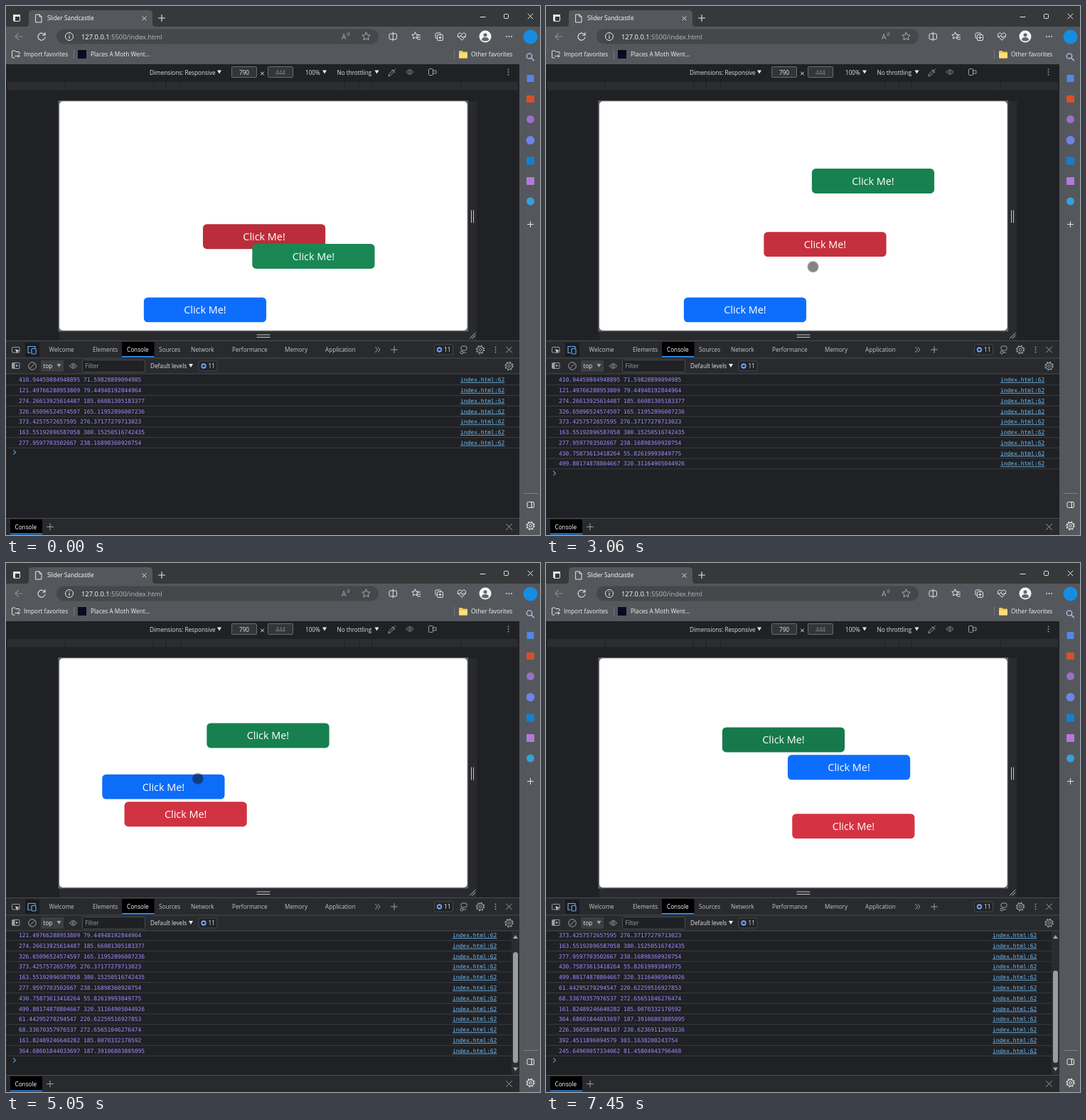
These frames come from a looping animation (751 by 745 pixels, 7.53 s). An HTML page:

```html
<!DOCTYPE html>
<html lang="en">
<head>
<meta charset="utf-8">
<title>Moving buttons</title>
<style>
html, body { margin: 0; width: 100%; height: 100%; overflow: hidden; background: #202124; }
svg { display: block; width: 751px; height: 745px; }
text { font-family: "Open Sans", "Noto Sans", sans-serif; white-space: pre; }
.mono { font-family: "DejaVu Sans Mono", "Noto Sans Mono", monospace; }
</style>
</head>
<body>
<script>
const LOOP = 7530, DUR = 2000, SCALE = 0.7266, LEFT = 75, TOP = 134.2;

// ---- drawing helpers ----
const rect = (x, y, w, h, fill, rx = 0, extra = '') =>
  `<rect x="${x}" y="${y}" width="${w}" height="${h}" fill="${fill}" rx="${rx}" ${extra}/>`;
const box = (x, y, w, h, stroke, rx = 0, fill = 'none', sw = 1) =>
  rect(x, y, w, h, fill, rx, `stroke="${stroke}" stroke-width="${sw}"`);
const disc = (x, y, r, fill) => `<circle cx="${x}" cy="${y}" r="${r}" fill="${fill}"/>`;
const ring = (x, y, r, stroke, w = 1) =>
  `<circle cx="${x}" cy="${y}" r="${r}" fill="none" stroke="${stroke}" stroke-width="${w}"/>`;
const line = (d, stroke = '#9aa0a6', w = 1) =>
  `<path d="${d}" fill="none" stroke="${stroke}" stroke-width="${w}" stroke-linecap="round" stroke-linejoin="round"/>`;
const shape = (d, fill) => `<path d="${d}" fill="${fill}"/>`;
const text = (x, y, s, fill = '#dfe1e5', size = 8.2, extra = '') =>
  `<text x="${x}" y="${y}" fill="${fill}" font-size="${size}" ${extra}>${s}</text>`;
const cross = (x, y, r, c, w) => line(`M${x - r} ${y - r}l${2 * r} ${2 * r}m0 ${-2 * r}l${-2 * r} ${2 * r}`, c, w);
const plus = (x, y, r, c, w) => line(`M${x - r} ${y}h${2 * r}M${x} ${y - r}v${2 * r}`, c, w);
const caret = (x, y, c = '#e8eaed') => shape(`M${x - 3} ${y - 2.5}h6l-3 5z`, c);
const dots = (x, y, dx, dy, c) => [-1, 0, 1].map(i => disc(x + i * dx, y + i * dy, 0.9, c)).join('');
const gear = (x, y, c) => ring(x, y, 1.8, c) + ring(x, y, 4.4, c, 1.1) +
  `<circle cx="${x}" cy="${y}" r="5.6" fill="none" stroke="${c}" stroke-width="1.3" stroke-dasharray="2.2 2.2"/>`;
const eye = (x, y, c) => line(`M${x - 5} ${y}q5 -7 10 0q-5 7 -10 0`, c) + ring(x, y, 1.6, c);
const star = (x, y, r, c) => {
  let d = '';
  for (let i = 0; i < 10; i++) {
    const a = Math.PI * (i / 5 - 0.5), q = i % 2 ? r * 0.48 : r;
    d += (i ? 'L' : 'M') + (x + q * Math.cos(a)).toFixed(2) + ' ' + (y + q * Math.sin(a)).toFixed(2);
  }
  return line(d + 'z', c);
};

// ---- browser window ----
const BAR = '#54585c', LIGHT = '#e6e7e8', DIM = '#9aa0a6', PANEL = '#292a2d', EDGE = '#494c50';

function titleBar() {
  return rect(0, 0, 751, 30, '#36383a') + rect(0, 29, 751, 53, BAR) +
    shape('M28 29q4 0 4 -4V11q0 -5 5 -5H201q5 0 5 5V25q0 4 4 4z', BAR) +
    box(10.5, 12.5, 9, 9, LIGHT, 1.5) + rect(10, 12, 10, 3, LIGHT, 1) + rect(10, 12, 3, 9, LIGHT, 1) +
    line('M42 12h5l3 3v8h-8zM47 12v3h3', LIGHT) +
    text(58, 20, 'Slider Sandcastle', '#fff', 8.3) +
    cross(194.5, 17.5, 2.5, LIGHT) + plus(219, 17, 4.5, LIGHT, 1.1) +
    line('M667 15.5h7', LIGHT) + box(700.5, 11.5, 6, 6, LIGHT, 1) + cross(737.5, 14.5, 3.5, LIGHT);
}

function addressBar() {
  return line('M23 43h-10m4.5 -4.5l-4.5 4.5l4.5 4.5', '#888c90', 1.1) +
    line('M54.3 40.5a5 5 0 1 0 .7 3.5M55 37.5v3.5h-3.5', LIGHT, 1.1) +
    rect(71, 32.5, 453, 21, '#44484b', 10.5) + ring(89, 43, 5.5, LIGHT) + line('M89 42.5v3M89 40.2v.1', LIGHT, 1.2) +
    text(106, 46.5, '127.0.0.1<tspan fill="#b9bcbf">:5500/index.html</tspan>', '#fff', 9.4) +
    text(472, 47, 'A', '#a9adb1', 10) + line('M480 38q1.5 1.5 0 3.5M482 37q2 2.5 0 5', '#a9adb1', .8) +
    star(506.5, 43, 6, '#a9adb1') +
    box(539, 39, 10.5, 8, LIGHT, 1.5) + line('M544.3 37v12', LIGHT) +
    star(575.5, 42, 5, LIGHT) + line('M578 41h4.5M578 44h4.5M579 47h3.5', LIGHT) +
    box(604, 38, 7.5, 7.5, LIGHT, 1.5) + box(606.5, 40.5, 8, 8, LIGHT, 1.5, BAR) + plus(610.5, 44.5, 2, LIGHT) +
    line('M641 48l-5 -5q-2 -4 2 -5q2 0 3 2q1 -2 3 -2q4 1 2 5zM635 43h3.5l1.5 -2l2 4l1.5 -2h3', LIGHT) +
    disc(674, 43, 8.5, '#f4f4f4') + disc(674, 40.7, 2.5, '#64686c') + shape('M669 48q0 -4 5 -4t5 4q-5 3 -10 0', '#64686c') +
    dots(707.5, 43, 3.5, 0, LIGHT) +
    line('M12 73h-2.5q-1 0 -1 -1V64q0 -1 1 -1h3l1.5 1.5h4q1 0 1 1v2M13 70.5h6m-2 -2l2 2l-2 2', LIGHT) +
    text(25, 71, 'Import favorites', '#f1f1f1', 8.3) + line('M95.5 62v12', '#74787c') +
    rect(101, 62, 12, 12, '#0a0a23') + text(119, 71, 'Places A Moth Went...', '#f1f1f1', 8.3) +
    line('M630.5 62v12', '#74787c') +
    shape('M637 64q0 -1 1 -1h3.5l1.5 1.5h5q1 0 1 1v7q0 1 -1 1h-10q-1 0 -1 -1z', '#f4c64f') + rect(637, 66.5, 12, 7, '#ffdc7c', 1) +
    text(654, 71, 'Other favorites', '#f1f1f1', 8.3);
}

function sideBar() {
  return rect(722, 29, 29, 716, BAR) + disc(737.5, 43.5, 10, '#168de2') +
    ring(736, 70.5, 3.7, '#a9c4f5', 1.3) + line('M738.8 73.3l3.5 3.5', '#a9c4f5', 1.5) +
    rect(732.5, 97, 10, 10, '#5187e8', 1) + rect(732, 126, 11, 10, '#d5512b', 1) +
    disc(737.5, 159.5, 5.5, '#9c6fc8') + disc(737.5, 189, 6, '#6f83e8') +
    rect(732, 212.5, 11, 11, '#147fd2', 1) + rect(732, 241, 11, 11, '#b678d8', 1) +
    disc(737.5, 275, 5.5, '#39a0d9') + plus(737.5, 307.5, 4, LIGHT) +
    line('M728 686.5h20', '#7c8084') + box(733, 698.5, 9.5, 8, LIGHT, 1.5) + line('M739.3 699v7', LIGHT, 1.2) +
    gear(737.5, 732, LIGHT);
}

function deviceArea() {
  const ticks = [2, 83.5, 208, 225.5, 246, 477, 497, 515, 640, 721];
  const ruler = ticks.slice(1).map((x, i) => rect(ticks[i], 107, x - ticks[i] - 1, 11.5, '#2c2d30')).join('');
  return rect(0, 82, 722, 390, '#202124') + ruler +
    text(202, 96.5, 'Dimensions: Responsive') + caret(300, 93) +
    box(317.5, 85.5, 35, 15, '#6a6d71', 1, '#333538') + text(335, 96.5, '790', '#e8eaed', 8.2, 'text-anchor="middle"') +
    cross(360.5, 95, 2, '#e8eaed') +
    box(368.5, 85.5, 35, 15, '#6a6d71', 1, '#333538') + text(386, 96.5, '444', '#85898d', 8.2, 'text-anchor="middle"') +
    text(421, 96.5, '100%') + caret(448, 93) + text(465.5, 96.5, 'No throttling') + caret(521.5, 93) +
    line('M538 98.5l1 -3l5 -5l2 2l-5 5zM543 89.5l4 4M545.5 91l2 -2.2', DIM) + eye(568, 93, '#85898d') +
    box(594.5, 88.5, 6, 9, DIM, 1) + line('M600 91h5v4h-5', DIM) + dots(706.5, 93, 0, 3.5, DIM) +
    rect(650, 134, 12.5, 325, '#292a2d') + rect(75, 459, 587, 12, '#292a2d') +
    line('M654.5 288v17M657.5 288v17', '#c5c7ca') + line('M353 463h18M353 466.5h18', '#c5c7ca') +
    line('M652.5 468l7.5 -7.5M656 468l4 -4', '#c5c7ca') +
    rect(73.5, 133, 576.5, 325.5, '#63666a', 1) + rect(75, 134.3, 573.6, 322.7, '#fff', 5);
}

function toolsPanel() {
  const tabs = [[60.5, 'Welcome'], [122, 'Elements'], [170, 'Console'], [215, 'Sources'], [260, 'Network'],
    [318, 'Performance'], [392, 'Memory'], [449, 'Application']];
  const issues = (x, y) => box(x + .5, y - 7, 26, 14, '#45484c', 2, '#222326') +
    disc(x + 7.5, y, 3.7, '#66a3ff') + rect(x + 5.8, y - 1.2, 3.4, 2.4, '#1b1c1f') + text(x + 14, y + 3, '11', '#e8eaed', 8.2);
  return rect(0, 471, 722, 274, '#202124') + rect(0, 471, 722, 47, PANEL) +
    rect(0, 471, 722, 1, '#484b4f') + rect(0, 495.5, 722, 1, EDGE) + rect(0, 517.5, 722, 1, EDGE) +
    box(8.5, 480.5, 10.5, 7.5, DIM, 1) + shape('M13 483l6 2.5l-2.5 1l-1 3z', '#d0d2d5') +
    rect(27, 474, 20, 20, '#1b1c1f') +
    line('M34 488.5h-3V479.5h10v2', '#66a9ef', 1.2) + box(36, 482.5, 6, 7.5, '#66a9ef', 1, 'none', 1.2) +
    rect(163, 473, 45.5, 22.5, '#000') + rect(163, 493, 45.5, 2, '#2b88e6') +
    tabs.map(([x, s]) => text(x, 487, s, s === 'Console' ? '#fff' : '#c3c6ca')).join('') +
    line('M519.5 480.5l3 3.5l-3 3.5M523 480.5l3 3.5l-3 3.5', DIM) + plus(546, 484, 4.5, DIM) + issues(602, 484) +
    box(640, 479, 8, 6, DIM, 2) + ring(641, 488, 2, DIM) + line('M643 488h4', DIM) +
    gear(667, 484, DIM) + dots(688.5, 484, 0, 3.5, DIM) + cross(707.5, 484, 4, DIM) +
    box(8.5, 502.5, 10.5, 8, DIM, 1) + rect(9, 503, 3.5, 7, DIM) + shape('M14 504.5l3.5 2l-3.5 2z', DIM) +
    ring(37, 507, 5.3, DIM) + line('M33.4 510.6l7.2 -7.2', DIM) +
    rect(49, 499, 32, 16, '#3c3e42', 1) + text(52.5, 510, 'top', '#e8eaed') + caret(74.5, 506.5, DIM) +
    eye(94.5, 507, DIM) + box(107.5, 498.5, 88, 17, EDGE, 1, '#202124') + text(111.5, 510, 'Filter', DIM) +
    text(203, 510, 'Default levels') + caret(260, 506.5) + issues(270.5, 507) + gear(707.5, 507, DIM);
}

const drawer = () => rect(0, 721, 722, 24, PANEL) + rect(0, 721, 722, 1, EDGE) + rect(6, 723, 45, 22, '#000') +
  rect(6, 742.5, 45, 2, '#2b88e6') + text(12.5, 737, 'Console', '#fff') + plus(62, 733.5, 4.5, DIM) + cross(707.5, 733.5, 4, DIM);

// ---- console ----
const logs = [
  '410.94459804948895 71.59828899094985', '121.49766288953809 79.44948192844964',
  '274.26613925614487 185.66081305183377', '326.65096524574597 165.11952896007236',
  '373.4257572657595 276.37177279713023', '163.55192096587058 380.15250516742435',
  '277.9597703502667 238.16898360920754', '430.75873613418264 55.82619993849775',
  '499.80174878804667 320.31164905044926', '61.44295270294547 220.62259516927853',
  '68.33670357976537 272.65651046276474', '161.82489246640282 185.0070332170592',
  '364.68601844033697 187.39106803805095', '226.36058398746107 230.62369112093236',
  '392.4511896094579 303.1638200243754', '245.64969057334062 81.45804943796468'];
const ROW = 14.78;

function consoleRows(n) {
  const bar = n > 11, right = bar ? 711 : 722;
  const scroll = Math.max(0, 526.5 + (n - 1) * ROW - 687);
  let out = '';
  for (let i = 0; i < n; i++) {
    const y = 526.5 + i * ROW - scroll;
    if (y < 512) continue;
    out += text(18, y + 2.7, logs[i], '#9f8bff', 7.96, 'class="mono"') +
      text(bar ? 628 : 639, y + 2.7, 'index.html:62', '#72bdf5', 7.96, 'class="mono" text-decoration="underline"') +
      rect(0, y + 6.7, right, 1, '#3a3c40');
  }
  const py = 628.5 + (n - 7) * ROW - scroll;
  out += line(`M10.5 ${py - 2.8}l3 2.8l-3 2.8`, '#4aa3ee', 1.1);
  if (bar) {
    const h = 170 * 203 / (n * ROW + 29);
    out += rect(711, 518.5, 11, 202.5, '#2b2c2f') + rect(713, 704 - h, 7, h, '#9a9c9f', 3.5) +
      shape('M713 529h7l-3.5 -5z', '#a6a8ab') + shape('M713 710.5h7l-3.5 5z', '#a6a8ab');
  }
  return out;
}

// ---- motion ----
const mix = (a, b, k) => a + (b - a) * k;

// CSS "ease": cubic-bezier(.25, .1, .25, 1)
function ease(x) {
  if (x <= 0) return 0;
  if (x >= 1) return 1;
  const bez = (a, b, u) => 3 * (1 - u) ** 2 * u * a + 3 * (1 - u) * u * u * b + u ** 3;
  let lo = 0, hi = 1;
  for (let i = 0; i < 24; i++) {
    const m = (lo + hi) / 2;
    if (bez(.25, .25, m) < x) lo = m; else hi = m;
  }
  return bez(.1, 1, lo);
}

// A value that is retargeted mid-way, like an interrupted CSS transition
const track = (start, keys) => t => {
  let from = start, to = start, at = -1e6;
  for (const [k, v] of keys) {
    if (k > t) break;
    from = mix(from, to, ease((k - at) / DUR));
    to = v;
    at = k;
  }
  return mix(from, to, ease((t - at) / DUR));
};

function along(points, t) {
  let i = 1;
  while (i < points.length - 1 && points[i][0] < t) i++;
  const a = points[i - 1], b = points[i], k = (t - a[0]) / (b[0] - a[0]);
  return a.slice(1).map((v, j) => mix(v, b[j + 1], k));
}

const FIRST = 7;
const taps = [2286, 2760, 3466, 3972, 4470, 4952, 5476, 6000, 6673];
const order = 'grbrgbgrg';
const clock = [[0, 0], [2270, 2270], [2350, 2285], [2430, 2430], [3780, 3780], [4490, 4540],
  [5690, 5738], [6640, 6718], [7450, 7410], [7530, 7490]];
const pointer = [[1330, 612, 400], [2030, 438, 346], [2190, 385, 354], [2270, 380, 354], [2300, 380, 354],
  [2760, 405, 326], [3466, 335, 424], [3780, 454, 386], [3972, 472, 376], [4470, 425, 207],
  [4540, 421.5, 232], [4952, 262, 316], [5476, 290, 272], [5738, 243.5, 335], [6000, 228, 350],
  [6673, 273, 307], [6718, 273, 306.5], [7130, 300, 450]];

const place = i => logs[i].split(' ').map(Number);

function makeButton(id, home, normal, hover, lit) {
  const [x0, y0] = place(home), xs = [], ys = [], hs = [];
  taps.forEach((t, i) => {
    if (order[i] === id) {
      const [x, y] = place(FIRST + i);
      xs.push([t, x]);
      ys.push([t, y]);
    }
    hs.push([t, order[i] === id ? 1 : 0]);
  });
  // Only changes of the hover state start a new fade
  const fades = hs.filter(([, v], i) => v !== (i ? hs[i - 1][1] : lit));
  return { id, normal, hover, x: track(x0, xs), y: track(y0, ys), h: track(lit, fades) };
}

const buttons = [
  makeButton('b', 5, [13, 110, 253], [11, 94, 215], 0),
  makeButton('r', 6, [220, 53, 69], [187, 45, 59], 1),
  makeButton('g', 4, [25, 135, 84], [21, 115, 71], 0)];

document.body.innerHTML = `<svg xmlns="http://www.w3.org/2000/svg" viewBox="0 0 751 745">
  <defs>
    <radialGradient id="touch"><stop offset="0.78" stop-color="#111" stop-opacity="0.52"/>
      <stop offset="1" stop-color="#111" stop-opacity="0.12"/></radialGradient>
    <clipPath id="rows">${rect(0, 518.5, 722, 202.5, '#000')}</clipPath>
  </defs>
  ${titleBar()}${addressBar()}${deviceArea()}
  ${buttons.map(b => `<g id="${b.id}">${rect(0, 0, 172.2, 34.9, '#000', 5.5)}
    ${text(86.1, 23, 'Click Me!', '#fff', 14.4, 'text-anchor="middle"')}</g>`).join('')}
  <circle id="pointer" r="8.4" fill="url(#touch)"/>
  ${toolsPanel()}<g clip-path="url(#rows)"><g id="console"></g></g>${drawer()}${sideBar()}
</svg>`;

const $ = id => document.getElementById(id);
for (const b of buttons) {
  b.node = $(b.id);
  b.face = b.node.querySelector('rect');
}
const dot = $('pointer'), rows = $('console');
const STEP = 79.68, START = 2430;
let shown = 0;

function render(ms) {
  // The picture advances in steps of about 80 ms
  const step = Math.floor((ms - START) / STEP + 0.2);
  const [t] = along(clock, Math.min(LOOP, Math.max(0, START + STEP * (step - 0.13))));

  for (const b of buttons) {
    const h = b.h(t);
    b.node.setAttribute('transform', `translate(${LEFT + b.x(t) * SCALE} ${TOP + b.y(t) * SCALE})`);
    b.face.setAttribute('fill', `rgb(${b.normal.map((v, i) => Math.round(mix(v, b.hover[i], h)))})`);
  }

  const active = t >= 1300 && t < 7130;
  dot.setAttribute('visibility', active ? 'visible' : 'hidden');
  if (active) {
    const [x, y] = along(pointer, t);
    dot.setAttribute('cx', x);
    dot.setAttribute('cy', y);
  }

  const n = FIRST + taps.filter(k => k <= t).length;
  if (n !== shown) {
    rows.innerHTML = consoleRows(n);
    shown = n;
  }
}

const begin = performance.now();
function tick() {
  render((performance.now() - begin) % LOOP);
  requestAnimationFrame(tick);
}
tick();
</script>
</body>
</html>
```
